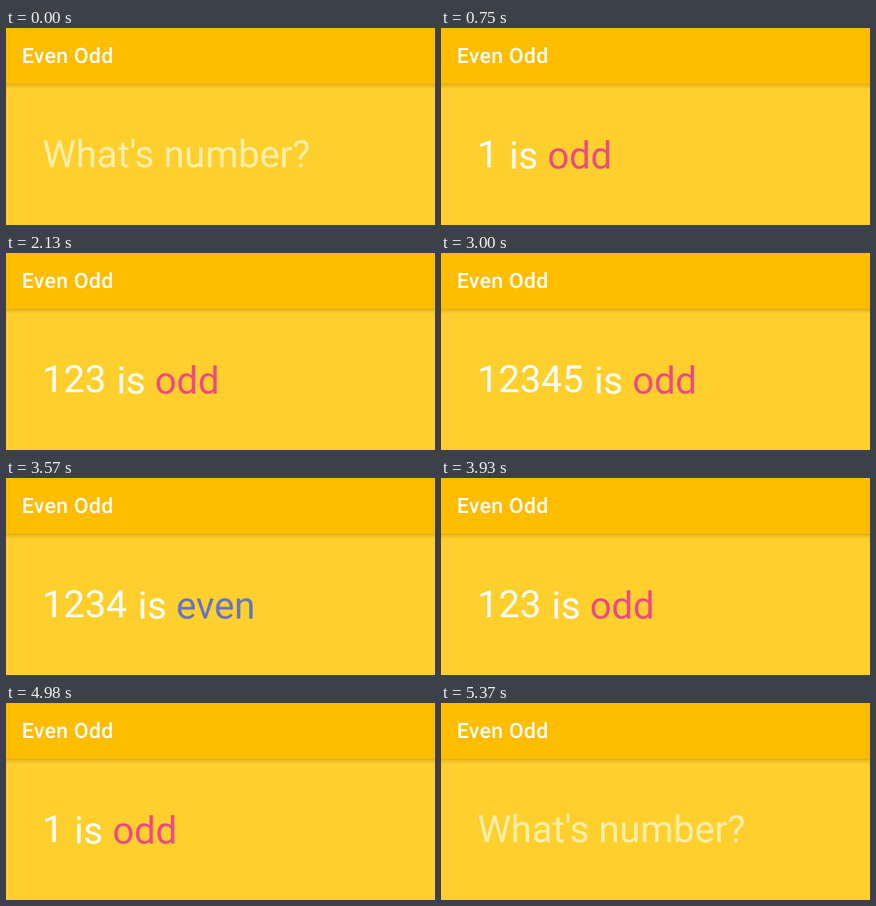
Recreate the animation shown at these times as an HTML page. Size 600 px wide and 276 px high, loop 5.49 s.

```html
<!DOCTYPE html>
<html lang="en">
<head>
<meta charset="utf-8">
<title>Even Odd</title>
<style>
  html, body { margin: 0; width: 100%; height: 100%; overflow: hidden; background: #ffd02d; }
  svg { display: block; width: 600px; height: 276px; }
  text { font-family: Roboto, sans-serif; fill: #fff; white-space: pre; text-rendering: geometricPrecision; }
  .title { font-size: 29.5px; font-weight: 500; letter-spacing: .5px; }
  .field { font-size: 52.8px; }
  .result { font-size: 53.1px; }
  .hint { fill: #ffeea9; }
</style>
</head>
<body>
<svg viewBox="0 0 600 276">
  <defs>
    <linearGradient id="shadow" x2="0" y2="1">
      <stop offset="0" stop-color="#a87800" stop-opacity=".42"/>
      <stop offset=".45" stop-color="#b88400" stop-opacity=".2"/>
      <stop offset="1" stop-color="#c89000" stop-opacity="0"/>
    </linearGradient>
  </defs>
  <rect width="600" height="276" fill="#ffd02d"/>
  <rect y="78" width="600" height="8" fill="url(#shadow)"/>
  <rect width="600" height="78" fill="#ffbd00"/>
  <text class="title" x="22.3" y="48.8">Even Odd</text>
  <text class="field hint" id="hint" x="51" y="195.2">What's number?</text>
  <text class="field" id="answer" x="50.8" y="195.2"><tspan id="number"></tspan><tspan class="result" dx="1.8" dy="1.4"> is <tspan id="parity"></tspan></tspan></text>
</svg>
<script>
  const LOOP = 5490;
  const DIGITS = '12345';
  const typed = [750, 1230, 1710, 2190, 2670];
  const erased = [3570, 3900, 4320, 4740, 5130];
  const [hint, answer, number, parity] =
    ['hint', 'answer', 'number', 'parity'].map(id => document.getElementById(id));

  const passed = (times, t) => times.filter(time => time <= t).length;
  let shown = -1;

  function render(t) {
    const count = passed(typed, t) - passed(erased, t);
    if (count === shown) return;
    shown = count;
    hint.style.display = count ? 'none' : '';
    answer.style.display = count ? '' : 'none';
    const value = DIGITS.slice(0, count);
    const even = value % 2 === 0;
    number.textContent = value;
    parity.textContent = even ? 'even' : 'odd';
    parity.style.fill = even ? '#6a75be' : '#ef4a84';
  }

  const start = performance.now();
  function tick() {
    render((performance.now() - start) % LOOP);
    requestAnimationFrame(tick);
  }
  tick();
</script>
</body>
</html>
```
